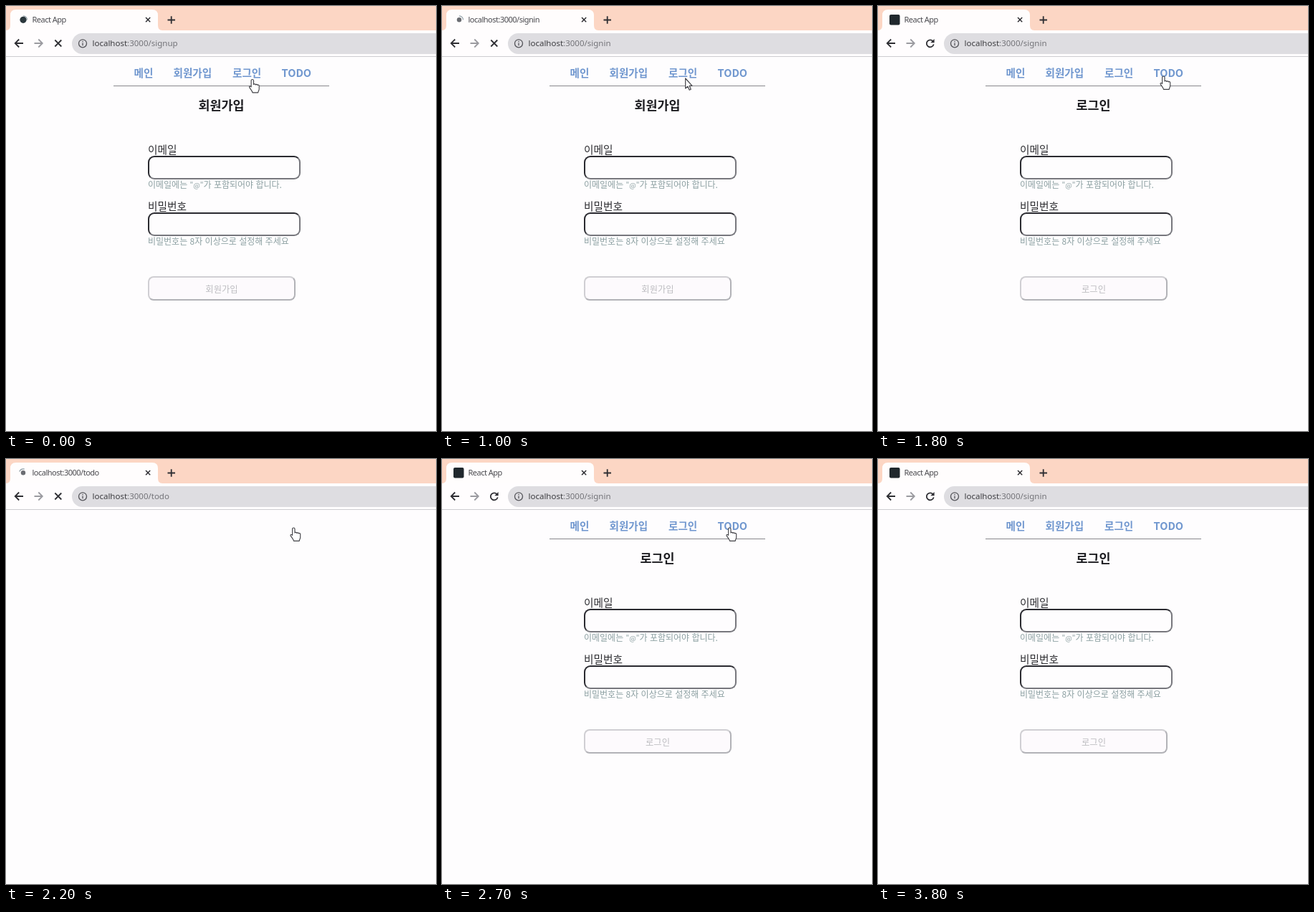
Animation of 600 by 593 pixels, one loop 3.9 s. Source, as an HTML page:

```html
<!DOCTYPE html>
<html lang="ko">
<head>
<meta charset="utf-8">
<title>React App</title>
<style>
  html, body { margin: 0; width: 100%; height: 100%; overflow: hidden; background: #fefdfe; }
  svg { position: absolute; left: 0; top: 0; width: 600px; height: 593px; }
  text { font-family: "Noto Sans CJK KR", "Noto Sans CJK", "Noto Sans", sans-serif; white-space: pre; }
  .latin { font-family: "Noto Sans", "Open Sans", sans-serif; }
  .tab { font-size: 11px; letter-spacing: -.5px; fill: #4a4a4f; }
  .url { font-size: 11.5px; fill: #737378; }
  .url .host { fill: #3c3c40; }
  .nav { font-size: 14.6px; font-weight: 700; fill: #7097cf; }
  .title { font-size: 17.4px; font-weight: 700; fill: #1c1c20; text-anchor: middle; }
  .label { font-size: 14.7px; fill: #2c2c30; }
  .hint { font-size: 12px; fill: #8b9fa1; }
  .hint .sign { font-size: 10px; }
  .submit { font-size: 12.3px; fill: #bdbdc1; text-anchor: middle; }
  .box { position: absolute; box-sizing: border-box; left: 198px; border: 2px solid; background: #fefdfe; }
  .input { width: 213px; height: 33px; border-radius: 9px; border-color: #2a2a30 #77777d #77777d #2a2a30; }
  .button { width: 206px; height: 34px; top: 377px; border-radius: 8px; border-color: #d0cfd3 #b2b2b7 #b2b2b7 #d0cfd3; background: #fdfafd; }
  .line { fill: none; stroke-width: 1.8; }
  .cursor path { fill: #fff; stroke: #414146; stroke-width: 1.2; stroke-linejoin: round; }
</style>
</head>
<body>
<div id="form">
  <div class="box input" style="top:209px"></div>
  <div class="box input" style="top:288px"></div>
  <div class="box button"></div>
</div>
<svg viewBox="0 0 600 593">
  <rect width="600" height="34" fill="#fcd6c4"/>
  <path d="M0 34Q6 34 6 27V13Q6 5 14 5H204Q212 5 212 13V27Q212 34 218 34Z" fill="#fffdfd"/>
  <rect y="34" width="600" height="36" fill="#fffdfe"/>
  <path d="M0 70.5H600" stroke="#cdccd0"/>
  <rect x="92" y="38" width="540" height="29" rx="14.5" fill="#dedde1"/>

  <g id="busyIcon">
    <circle id="dot" cx="24" cy="19.3"/>
    <path id="spin" d="M24 13.8A5.5 5.5 0 0 1 29.5 19.3" fill="none" stroke="#8b9ba3" stroke-width="1.2"/>
  </g>
  <rect id="readyIcon" x="16" y="12" width="14.5" height="14.5" rx="2" fill="#20282d"/>
  <text id="tab" class="latin tab" x="36.5" y="23"></text>
  <g class="line" stroke="#2e2e33">
    <path d="M195 16l6.2 6.2M201.2 16l-6.2 6.2" stroke-width="1.5"/>
    <path d="M225.5 19.5H236M230.7 14.3V24.7"/>
    <path d="M24 52H13M18.2 46.5L12.7 52l5.5 5.5"/>
    <path d="M39.5 52H50.5M45.3 46.5L50.8 52l-5.5 5.5" stroke="#9b9ba0"/>
    <path id="stop" d="M68.3 47.5l9 9M77.3 47.5l-9 9"/>
    <g id="reload">
      <path d="M76.6 49A5 5 0 1 0 77.7 53.4"/>
      <path d="M78.6 46v5.3h-5.3z" fill="#2e2e33" stroke="none"/>
    </g>
    <g stroke="#55555a" stroke-width="1.3">
      <circle cx="107" cy="52.3" r="5.5"/>
      <path d="M107 51.5v3.8M107 49v1.3"/>
    </g>
  </g>
  <text class="latin url" x="120.5" y="56.3"><tspan class="host">localhost</tspan><tspan id="path"></tspan></text>

  <g id="page">
    <g class="nav">
      <text x="178.5" y="99.3">메인</text>
      <text x="233.5" y="99.3">회원가입</text>
      <text x="316" y="99.3">로그인</text>
      <text x="384.5" y="99.3">TODO</text>
    </g>
    <path d="M150 111.5H451" stroke="#88888d"/>
    <text id="title" class="title" x="300.5" y="145"></text>
    <text class="label" x="198" y="205.5">이메일</text>
    <text class="hint" x="198" y="254.3">이메일에는 <tspan class="sign">"@"</tspan>가 포함되어야 합니다.</text>
    <text class="label" x="198" y="285.3">비밀번호</text>
    <text class="hint" x="198" y="333.3">비밀번호는 8자 이상으로 설정해 주세요</text>
    <text id="submit" class="submit" x="301" y="399.5"></text>
  </g>

  <g id="cursor" class="cursor">
    <path id="arrow" d="M0 0V14L3.2 11.2L5.5 16.2L7.6 15.3L5.5 10.3H9.4Z"/>
    <path id="hand" transform="scale(.94)" d="M-2 11V1.8a1.8 1.8 0 0 1 3.6 0V7.5c.3-1.2 3-1 3 .4c.4-1 2.8-.8 2.8.5c.5-.8 2.4-.4 2.4 1V14c0 2-1.2 3-1.6 5.5H0C-.4 17-3 14.5-4.6 11.8c-.8-1.6 1.2-2.4 2.6-.8Z"/>
  </g>
</svg>
<script>
const LOOP = 3900, STEP = 100;
const el = id => document.getElementById(id);
const show = (id, on) => { el(id).style.visibility = on ? 'visible' : 'hidden'; };
const NAMES = { signup: '회원가입', signin: '로그인' };

// Each track lists [start ms, value]; a value holds until the next start.
const tracks = {
  path: [[0, 'signup'], [800, 'signin'], [2000, 'todo'], [2400, 'signin']],
  view: [[0, 'signup'], [1100, 'signin'], [2100, ''], [2400, 'signin']],
  load: [[0, 'page'], [200, ''], [800, 'wait'], [1100, 'page'], [1400, ''], [2000, 'wait'], [2400, 'page'], [2500, '']],
  pointer: [[0, 'hand'], [200, 'arrow'], [700, 'hand'], [900, 'arrow'], [1300, 'hand'], [1500, 'arrow'], [1700, 'hand'], [3400, 'arrow'], [3700, '']]
};
// Cursor tip: time, x, y
const moves = [
  [0, 344, 102.5], [200, 343.5, 106.5], [600, 343.5, 106.5], [800, 339.5, 101], [1300, 340, 101],
  [1700, 398.5, 98], [1900, 398.5, 98], [2100, 401.5, 96], [3300, 401.5, 96], [3700, 571, 0], [LOOP, 571, 0]
];

const valueAt = (track, t) => track.filter(([start]) => start <= t).pop()[1];

function tipAt(t) {
  const i = moves.findIndex(m => m[0] > t);
  const [t0, x0, y0] = moves[i - 1], [t1, x1, y1] = moves[i];
  const k = (t - t0) / (t1 - t0);
  return [x0 + (x1 - x0) * k, y0 + (y1 - y0) * k];
}

function render(now) {
  const t = Math.floor(now % LOOP / STEP) * STEP;
  const path = valueAt(tracks.path, t), view = valueAt(tracks.view, t);
  const load = valueAt(tracks.load, t), pointer = valueAt(tracks.pointer, t);
  const waiting = load === 'wait';

  el('path').textContent = ':3000/' + path;
  el('tab').textContent = waiting ? 'localhost:3000/' + path : 'React App';
  el('title').textContent = el('submit').textContent = NAMES[view] || '';
  show('page', view);
  show('form', view);

  show('busyIcon', load);
  show('readyIcon', !load);
  show('stop', load);
  show('reload', !load);
  el('dot').setAttribute('r', waiting ? 3.2 : 4.6);
  el('dot').setAttribute('fill', waiting ? '#6b6d72' : '#2b383d');
  el('spin').setAttribute('transform', `rotate(${t * (waiting ? -.36 : .36)} 24 19.3)`);

  show('arrow', pointer === 'arrow');
  show('hand', pointer === 'hand');
  el('cursor').setAttribute('transform', `translate(${tipAt(t)})`);
}

const begin = performance.now();
function frame() {
  render(performance.now() - begin);
  requestAnimationFrame(frame);
}
frame();
</script>
</body>
</html>
```
